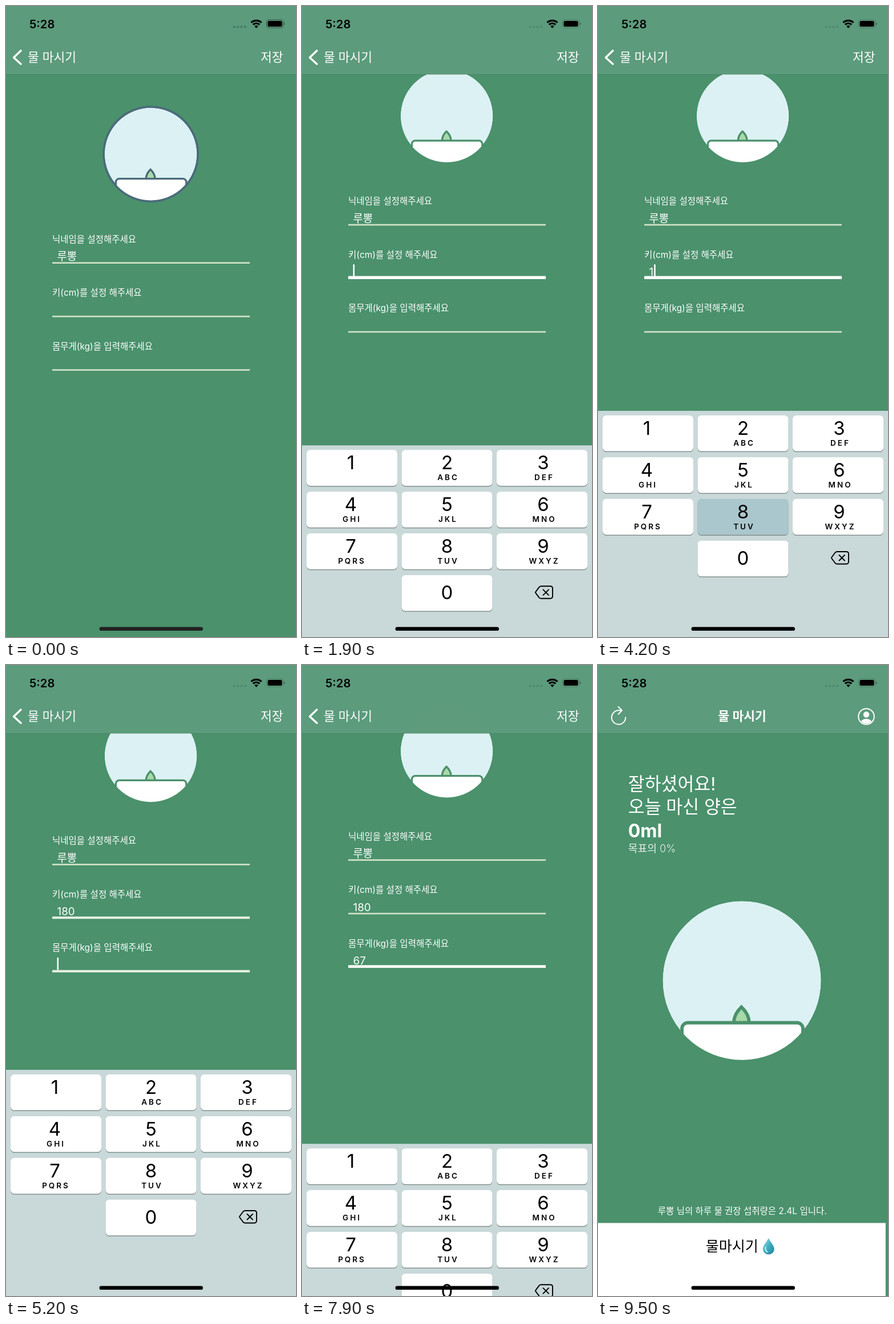
Write an HTML page that moves like this. It is 508 by 1102 pixels and loops after 9600 ms.

```html
<!DOCTYPE html>
<html lang="ko">
<head>
<meta charset="utf-8">
<style>
  html, body { margin: 0; width: 100%; height: 100%; overflow: hidden; background: #4a916c; }
  svg { display: block; width: 100%; height: 100%; }
  text { font-family: Inter, 'Noto Sans CJK KR', 'Noto Sans CJK', sans-serif; fill: #fff; white-space: pre; }
  .mid { text-anchor: middle; }
  .nav { font-size: 21.5px; }
  .label { font-size: 15.5px; }
  .value { font-size: 18.8px; }
  .big { font-size: 31.4px; }
  .digit { font-size: 33px; fill: #000; }
  .letters { font-size: 13.5px; font-weight: 600; letter-spacing: 3px; fill: #000; }
  .line { fill: none; stroke: #fff; stroke-linecap: round; stroke-linejoin: round; }
  .ink { fill: none; stroke: #000; stroke-linecap: round; stroke-linejoin: round; stroke-width: 1.9; }
</style>
</head>
<body>
<svg viewBox="0 0 508 1102">
  <defs>
    <clipPath id="disc"><circle r="82"/></clipPath>
    <clipPath id="face"><circle cx="470" cy="90" r="12.5"/></clipPath>
    <linearGradient id="water" x2="1" y2="1">
      <stop offset="0" stop-color="#9be0e6"/><stop offset=".5" stop-color="#3fb0c0"/><stop offset="1" stop-color="#1f7f9c"/>
    </linearGradient>
    <g id="pot" stroke-width="3.4">
      <circle r="82.5" fill="#dcf1f3"/>
      <g clip-path="url(#disc)">
        <path d="M-8.2 44C-8.700 36 -4.700 31 -.5 27C3.800 31 7.800 36 7.300 44Z" fill="#a9d8a9"/>
        <rect x="-61.200" y="43" width="123.500" height="60" rx="6" fill="#fff"/>
      </g>
      <circle r="82.5" fill="none"/>
    </g>
  </defs>

  <g id="home">
    <rect width="508" height="1102" fill="#4a916c"/>
    <text class="big" x="54" y="219">잘하셨어요!</text>
    <text class="big" x="54" y="259">오늘 마신 양은</text>
    <text x="54" y="301" font-size="32" font-weight="700">0ml</text>
    <text x="54" y="327" font-size="18.200" font-weight="300" opacity=".85">목표의 0%</text>
    <use href="#pot" transform="translate(253.300 551) scale(1.716)"/>
    <text class="label mid" x="254" y="959">루뽕 님의 하루 물 권장 섭취량은 2.4L 입니다.</text>
    <rect y="974.500" width="508" height="128" fill="#fff"/>
    <text x="190" y="1024" font-size="25" font-weight="500" style="fill:#000">물마시기</text>
    <path d="M300 1001C303 1007 310 1014 310 1020A10 9.500 0 0 1 290 1020C290 1014 297 1007 300 1001Z" fill="url(#water)"/>
    <path d="M295 1017C294 1022 296 1024 298 1025" class="line" stroke-width="1.800" opacity=".8"/>
  </g>

  <g id="form">
    <rect width="508" height="1102" fill="#4a916c"/>
    <g id="content">
      <use href="#pot" transform="translate(253.600 258.600)"/>
      <g id="fields"></g>
      <rect id="cursor" width="2.600" height="22" rx="1.300" fill="#fff"/>
    </g>
  </g>

  <g id="keyboard"><rect y="707" width="508" height="420" fill="#c9d8d8"/></g>

  <rect width="508" height="119.500" fill="#5c9b7c"/>
  <path d="M0 119.500H508" stroke="#000" opacity=".1"/>
  <path id="ghost" d="M197 119.500A57 57 0 0 1 311 119.500Z" fill="#68a37f"/>

  <g id="formNav">
    <path class="line" d="M26 78L13.500 90L26 101.300" stroke-width="3.500"/>
    <text class="nav" x="446" y="97">저장</text>
  </g>
  <text id="backTitle" class="nav mid" x="80.500" y="97">물 마시기</text>
  <text id="homeTitle" class="nav mid" x="254" y="97" font-weight="600">물 마시기</text>
  <g id="homeNav">
    <path class="line" d="M48.300 91.500A12.200 12.200 0 1 1 36 79.300H42M35.500 73L42 79.300L35.500 86" stroke-width="2"/>
    <circle class="line" cx="470" cy="90" r="13.800" stroke-width="2"/>
    <g fill="#fff" clip-path="url(#face)"><circle cx="470" cy="86.500" r="5.200"/><ellipse cx="470" cy="101" rx="10" ry="7"/></g>
  </g>

  <text x="41" y="38.500" font-size="20.200" font-weight="600" style="fill:#000">5:28</text>
  <path id="dots" d="M400 36.500h.01m6.300 0h.01m6.300 0h.01m6.300 0h.01" stroke-width="4.200" stroke-linecap="round"/>
  <g fill="none" stroke="#000" stroke-width="3.200">
    <path d="M429.500 28.900A13.200 13.200 0 0 1 447.500 28.900M432.800 32.500A8.300 8.300 0 0 1 444.200 32.500"/>
    <path d="M435.300 35.400A4.500 4.500 0 0 1 441.700 35.400L438.500 38.800Z" fill="#000" stroke="none"/>
  </g>
  <rect id="battery" x="456.500" y="24" width="29" height="14" rx="4" fill="none" stroke="#000" stroke-width="1.200"/>
  <rect x="458.500" y="26" width="25" height="10" rx="2.500"/>
  <path d="M487 28.500Q489.500 31 487 33.500Z" opacity=".5"/>
  <rect id="homeBar" x="163.500" y="1084.400" width="181.500" height="6.700" rx="3.350"/>
</svg>

<script>
const LOOP = 9600;
const PITCH = 93.500;
const FOCUS_HEIGHT = 1680, FOCUS_WEIGHT = 5090, DISMISS = 7840, POP = 9085;
const labels = ['닉네임을 설정해주세요', '키(cm)를 설정 해주세요', '몸무게(kg)을 입력해주세요'];
const letters = ['', 'ABC', 'DEF', 'GHI', 'JKL', 'MNO', 'PQRS', 'TUV', 'WXYZ'];
// Each press: key, time, field it types into.
const presses = [['1', 3600, 1], ['8', 4200, 1], ['0', 4400, 1], ['6', 7000, 2], ['7', 7500, 2]];
// Cursor blinks: fade-out start, fade-in start, fade-in duration.
const blinks = [[2250, 2550, 200], [3250, 3599, 1], [5650, 5950, 200], [6650, 6999, 1]];

const el = id => document.getElementById(id);
const clamp = v => Math.min(1, Math.max(0, v));
const mix = (a, b, p) => a + (b - a) * p;
const ease = (t, start, duration = 220) => {
  const p = clamp((t - start) / duration);
  return p * p * (3 - 2 * p);
};
const spring = (t, start) => {
  const x = Math.max(0, t - start) * 0.0165;
  return 1 - (1 + x) * Math.exp(-x);
};
const move = (id, x, y = 0) => el(id).setAttribute('transform', `translate(${x} ${y})`);

el('fields').innerHTML = labels.map((label, i) => `
  <g transform="translate(0 ${i * PITCH})">
    <text class="label" x="81" y="412.6">${label}</text>
    <text class="value" id="value${i}" x="89.5" y="444">${i ? '' : '루뽕'}</text>
    <rect id="rule${i}" x="81" width="346"/>
  </g>`).join('');

function keyMarkup(digit, column, row) {
  const x = 8 + column * 166.500, y = 715 + row * 72.900;
  const center = 254 + (column - 1) * 168.500;
  const caption = digit ? letters[digit - 1] : '';
  return `<rect x="${x}" y="${y + 1.500}" width="159" height="62.6" rx="6.5" fill="#84908f"/>
    <rect id="key${digit}" x="${x}" y="${y}" width="159" height="62.6" rx="6.5"/>
    <text class="digit mid" x="${center}" y="${y + (digit ? 34 : 42.300)}">${digit}</text>
    <text class="letters mid" x="${center + 2}" y="${y + 53}">${caption}</text>`;
}
let keys = keyMarkup(0, 1, 3);
for (let n = 0; n < 9; n++) keys += keyMarkup(n + 1, n % 3, Math.floor(n / 3));
el('keyboard').innerHTML += keys + `
  <path class="ink" d="M419 953H435Q439 953 439 957V970Q439 974.500 435 974.500H419Q417 974.500 415.500 973L409.500 965Q408.500 963.700 409.500 962.500L415.500 954.500Q417 953 419 953Z
    M422.500 959L432 968.500M432 959L422.500 968.500"/>`;

function cursorOpacity(t) {
  if (t < 1750 || t >= DISMISS) return 0;
  return blinks.reduce((alpha, [out, back, rise]) =>
    t < out ? alpha : Math.max(1 - clamp((t - out) / 150), clamp((t - back) / rise)), 1);
}

function drawForm(t) {
  const first = ease(t, FOCUS_HEIGHT), second = ease(t, FOCUS_WEIGHT), done = ease(t, DISMISS);
  const shift = 66.500 * (first + second - 2 * done);
  move('content', 0, -shift);
  el('ghost').setAttribute('opacity', 0.3 * clamp((shift - 100) / 33));

  [0, first - second, second - done].forEach((focus, i) => {
    const rule = el('rule' + i), height = mix(2.700, 5.400, focus);
    rule.setAttribute('y', 450 - height);
    rule.setAttribute('height', height);
    rule.setAttribute('fill', `rgb(${mix(208, 255, focus)},${mix(226, 255, focus)},${mix(198, 255, focus)})`);
  });

  for (const i of [1, 2]) {
    el('value' + i).textContent = presses
      .filter(([, time, field]) => field === i && t >= time + 100).map(([key]) => key).join('');
  }
  const active = t < FOCUS_WEIGHT + 50 ? 1 : 2;
  const cursor = el('cursor'), value = el('value' + active);
  const width = value.textContent ? value.getComputedTextLength() + 1 : 0;
  cursor.setAttribute('x', 89.500 + width);
  cursor.setAttribute('y', 424 + active * PITCH);
  cursor.setAttribute('opacity', cursorOpacity(t));
}

function drawKeyboard(t) {
  const raised = spring(t, 1698) - spring(t, DISMISS - 10);
  const visible = t >= 1698 && t < 8400;
  el('keyboard').style.display = visible ? '' : 'none';
  move('keyboard', 0, 395 * (1 - raised));
  for (let n = 0; n < 10; n++) {
    const down = presses.some(([key, time]) => +key === n && t >= time && t < time + 150);
    el('key' + n).setAttribute('fill', down ? '#aac7cd' : '#fff');
  }
}

function drawPop(t) {
  const p = spring(t, POP);
  move('home', -152 * (1 - p));
  move('form', 508 * p);
  move('backTitle', 173.500 * p);
  move('homeTitle', -173.500 * (1 - p));
  el('formNav').setAttribute('opacity', clamp(1 - p * 1.500));
  el('backTitle').setAttribute('opacity', clamp(1 - p * 1.500));
  el('homeTitle').setAttribute('opacity', p);
  el('homeNav').setAttribute('opacity', p);
}

function drawAccents(t) {
  const resting = t < 1700 || (t >= 8400 && t < 9100);
  el('pot').setAttribute('stroke', resting ? '#4a6b7a' : '#4a916c');
  el('homeBar').setAttribute('fill', resting ? '#222' : '#000');
  el('dots').setAttribute('stroke', resting ? '#3f7f64' : '#4b8d6b');
  el('battery').setAttribute('opacity', resting ? 0.45 : 0.2);
}

function draw(t) {
  drawForm(t);
  drawKeyboard(t);
  drawPop(t);
  drawAccents(t);
}

const start = performance.now();
function frame() {
  draw((performance.now() - start) % LOOP);
  requestAnimationFrame(frame);
}
frame();
</script>
</body>
</html>
```
